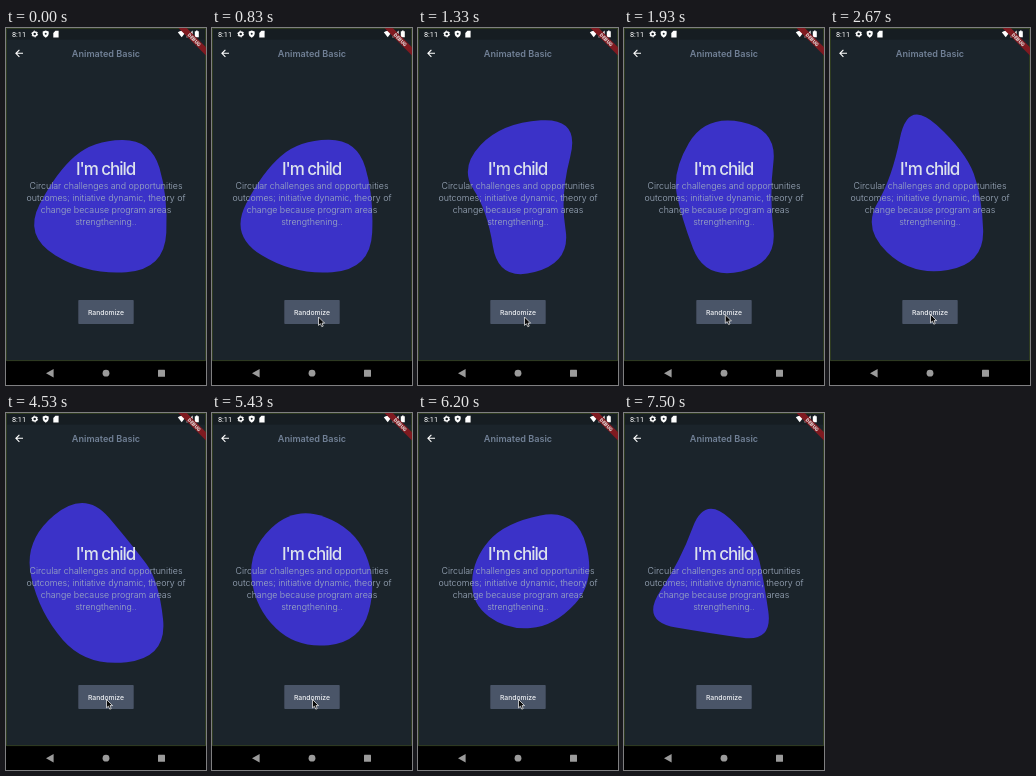
An HTML page that plays this animation: 200x357 px, repeating every 7.53 s.

```html
<!DOCTYPE html>
<html lang="en">
<head>
<meta charset="utf-8">
<title>Animated Basic</title>
<style>
  html, body { margin: 0; width: 100%; height: 100%; overflow: hidden; background: #1b242b; }
  svg { display: block; width: 100vw; height: 100vh; }
  text { font-family: Inter, "Open Sans", sans-serif; text-anchor: middle; }
  .clock { font: 7.3px Roboto, sans-serif; text-anchor: start; fill: #fff; }
  .title { font-size: 9.1px; font-weight: 600; fill: #718096; }
  .heading { font-size: 17px; font-weight: 500; letter-spacing: -1.05px; fill: #dce2ec; }
  .body { font-size: 8.85px; font-weight: 300; fill: #a0aec0; }
  .label { font-size: 6.8px; font-weight: 500; fill: #f0f2f5; }
  .debug { font: 900 5px Roboto, sans-serif; fill: #e4dada; }
</style>
</head>
<body>
<svg viewBox="0 0 200 357">
  <rect width="200" height="357" fill="#1b242b"/>
  <rect width="200" height="11.7" fill="#000" fill-opacity=".2"/>

  <text class="clock" x="6" y="8.5">8:11</text>
  <g fill="#fff">
    <circle cx="28.7" cy="6" r="2" fill="none" stroke="#fff" stroke-width="1.5"/>
    <circle cx="28.7" cy="6" r="2.9" fill="none" stroke="#fff" stroke-width="1" stroke-dasharray="1.5 1.537"/>
    <path d="M39.7 2.4L42.7 3.6V6Q42.5 8.6 39.7 9.8Q36.9 8.6 36.7 6V3.6Z"/>
    <circle cx="39.7" cy="5.8" r="1" fill="#1b242b"/>
    <path d="M49.4 2.8H52.6V9.4H47.3V4.9Z"/>
    <path d="M171.8 4.2Q175.7 1.2 179.6 4.2L175.7 9.2Z"/>
    <path d="M186.6 2.6V9.2H180Z"/>
    <path d="M188.8 3.2H190V2.4H191.6V3.2H192.8V9.3H188.8Z"/>
  </g>
  <path d="M17 25.3H10M13.4 21.8L9.9 25.3L13.4 28.8" fill="none" stroke="#fff" stroke-width="1.1"/>
  <text class="title" x="100" y="29">Animated Basic</text>

  <path id="blob" fill="#3b32c8"/>

  <text class="heading" x="99.5" y="147">I'm child</text>
  <g class="body">
    <text x="100" y="160.5">Circular challenges and opportunities</text>
    <text x="100" y="172.8">outcomes; initiative dynamic, theory of</text>
    <text x="100" y="185">change because program areas</text>
    <text x="100" y="197.2">strengthening..</text>
  </g>

  <rect x="72.3" y="272" width="55.4" height="24" rx=".8" fill="#4a5568"/>
  <text class="label" x="100" y="286.7">Randomize</text>

  <rect y="333" width="200" height="24" fill="#000"/>
  <path d="M.5 332.6V.5H199.5V332.6Z" fill="none" stroke="#34421f" stroke-width=".8"/>
  <g fill="#9b9b9b">
    <path d="M47.6 341V349.4L40 345.2Z"/>
    <circle cx="100" cy="345.2" r="3.4"/>
    <rect x="152" y="341.8" width="7" height="7" rx=".5"/>
  </g>

  <g transform="translate(200 0) rotate(45)">
    <rect x="-20" y="13.6" width="40" height="5.9" fill="#7f1a20"/>
    <text class="debug" y="18.4">DEBUG</text>
  </g>

  <path id="cursor" d="M0 0V8.4L1.9 6.7L3.3 9.7L4.7 9.1L3.5 6.1H6.1Z" fill="#0a0a0a" stroke="#fff" stroke-width=".7"/>
</svg>
<script>
  const LOOP = 7530, CX = 100, CY = 168;
  const FIRST_CLICK = 800, CLICK_GAP = 930, MORPH = 520;
  const blob = document.getElementById('blob');
  const cursor = document.getElementById('cursor');

  // Each blob is seven control radii, evenly spaced clockwise from the right.
  const blobs = [
    [62, 94, 81, 92, 55, 57, 72],
    [42, 85, 88, 34, 65, 75, 100],
    [52, 87, 82, 75, 42, 100, 57],
    [82, 75, 82, 54, 62, 62, 56],
    [53, 98, 88, 74, 92, 94, 44],
    [65, 78, 69, 63, 71, 77, 68],
    [78, 58, 50, 52, 50, 60, 93],
    [40, 78, 54, 93, 48, 88, 50]
  ];

  const mix = (a, b, k) => a + (b - a) * k;
  const ramp = (t, start, length) => {
    const k = Math.min(1, Math.max(0, (t - start) / length));
    return k * k * (3 - 2 * k);
  };

  // Every click morphs the blob into the next one.
  function radiiAt(t) {
    const click = Math.floor((t - FIRST_CLICK) / CLICK_GAP);
    const i = Math.min(blobs.length - 2, Math.max(0, click));
    const k = ramp(t, FIRST_CLICK + i * CLICK_GAP, MORPH);
    return blobs[i].map((r, j) => mix(r, blobs[i + 1][j], k));
  }

  // Quadratic curves joined at the midpoints of the control polygon.
  function outline(radii) {
    const pts = radii.map((r, i) => {
      const a = i * 2 * Math.PI / radii.length;
      return [CX + r * Math.cos(a), CY + r * Math.sin(a)];
    });
    const mids = pts.map((p, i) => {
      const q = pts[(i + 1) % pts.length];
      return [(p[0] + q[0]) / 2, (p[1] + q[1]) / 2];
    });
    return `M${mids.at(-1)}` + pts.map((p, i) => `Q${p} ${mids[i]}`).join('') + 'Z';
  }

  // The pointer comes in from below, settles, then leaves at once.
  function placeCursor(t) {
    const away = 1 - ramp(t, 150, 550);
    const shift = ramp(t, 1700, 300);
    const x = 106.5 + 18 * away - 6 * shift;
    const y = 289 + 60 * away - 2.5 * shift;
    cursor.setAttribute('visibility', t > 150 && t < 6600 ? 'visible' : 'hidden');
    cursor.setAttribute('transform', `translate(${x} ${y})`);
  }

  const origin = performance.now();
  function draw(now) {
    const t = Math.max(0, now - origin) % LOOP;
    blob.setAttribute('d', outline(radiiAt(t)));
    placeCursor(t);
    requestAnimationFrame(draw);
  }
  draw(origin);
</script>
</body>
</html>
```
